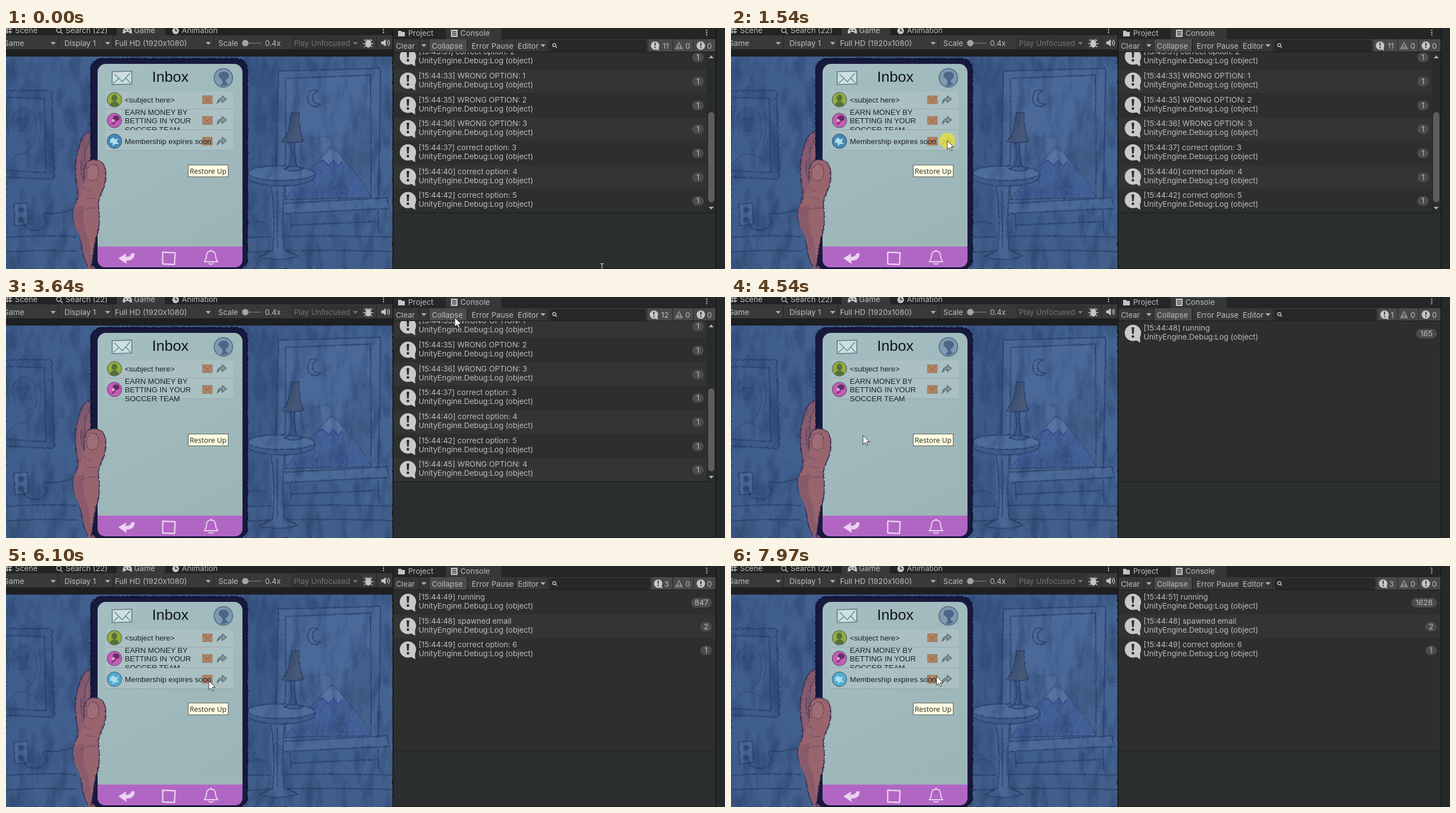
An HTML page for the animation above (8 s loop, 1280 by 430 pixels).

```html
<!DOCTYPE html>
<html lang="en">
<head>
<meta charset="utf-8">
<title>Inbox console</title>
<style>
html, body { margin: 0; width: 100%; height: 100%; overflow: hidden; background: #1c1d1d; }
svg { position: absolute; left: 0; top: 0; width: 1280px; height: 430px; }
#ui { will-change: transform; }
text { font: 13.5px Inter, Roboto, sans-serif; fill: #bcbebe; white-space: pre; }
.phone text { font: 13.45px "Liberation Sans", Arial, sans-serif; fill: #1c2226; }
.phone .head { font-size: 26.6px; fill: #11161c; }
.tip { font: 12.7px "Open Sans", "Noto Sans", sans-serif; fill: #222; }
.dim { fill: #747676; }
.mid { text-anchor: middle; }
.line { fill: none; stroke: #263961; stroke-width: 2; stroke-opacity: .72; stroke-linecap: round; stroke-linejoin: round; }
</style>
</head>
<body>
<svg id="stage" viewBox="0 0 1280 430"></svg>
<svg id="ui" viewBox="0 0 1280 430"></svg>
<script>
const LOOP = 8000, ROW = 42.67;

// ---------- drawing helpers ----------
const rect = (x, y, w, h, fill, more = '') =>
  `<rect x="${x}" y="${y}" width="${w}" height="${h}" fill="${fill}" ${more}/>`;
const path = (d, fill, more = '') => `<path d="${d}" fill="${fill}" ${more}/>`;
const line = (d, more = '') => `<path class="line" d="${d}" ${more}/>`;
const circle = (x, y, r, fill, more = '') =>
  `<circle cx="${x}" cy="${y}" r="${r}" fill="${fill}" ${more}/>`;
const oval = (x, y, rx, ry, fill, more = '') =>
  `<ellipse cx="${x}" cy="${y}" rx="${rx}" ry="${ry}" fill="${fill}" ${more}/>`;
const text = (x, y, s, cls = '') =>
  `<text x="${x}" y="${y}" class="${cls}">${s.replace(/</g, '&lt;')}</text>`;
const at = (x, y, s) => `<g transform="translate(${x} ${y})">${s}</g>`;
const outlined = (d, fill) => path(d, fill) + line(d);
const down = (x, y, fill = '#b0b2b2') => path(`M${x - 4.5} ${y - 2}h9l-4.5 5z`, fill);
const dots = (x, y) => [-4, 0, 4].map(d => circle(x, y + d, 1.2, '#c4c4c4')).join('');
const lens = (x, y, r, c) =>
  `<g fill="none" stroke="${c}" stroke-width="1.5">${circle(x, y, r, 'none')}` +
  `<path d="M${x + r * .7} ${y + r * .7}l${r} ${r}"/></g>`;

const bubble = (x, y, r, mark) => at(x, y, `<g transform="scale(${r / 14.5})">` +
  circle(0, 0, 14.5, '#c8caca') + path('M4 12L13 17.5 12.5 4z', '#c8caca') +
  path('M-2.4 -10h4.8l-1 12h-2.8z', mark) + circle(0, 6.6, 2.4, mark) + '</g>');

let seed = 7;
const rnd = () => (seed = seed * 16807 % 2147483647) / 2147483647;

// ---------- painted room ----------
function room() {
  let s = rect(0, 50, 688, 380, 'url(#wall)');
  for (let j = 0; j < 7; j++)
    for (let i = 0; i < 20; i++)
      s += oval(8 + i * 36 + (j % 2) * 18 + rnd() * 5, 68 + j * 46, 6, 11, '#304a78',
        `opacity="${.15 + rnd() * .2}"`);

  // skirting
  s += path('M0 374Q60 368 125 372V430H0z', '#425f8b') + path('M430 374H688V430H430z', '#425f8b');
  s += line('M0 374Q60 368 125 372M0 400Q60 395 125 398M430 374Q560 369 688 373M430 400Q560 394 688 399');

  // picture frame
  s += path('M0 113L80 114 84 270 0 266z', '#3d5a88');
  let lace = 'M0 113';
  for (let x = 0; x < 80; x += 10) lace += 'q5 -4 10 0';
  for (let y = 113; y < 268; y += 12) lace += 'q5 6 .3 12';
  for (let x = 83; x > 0; x -= 10) lace += 'q-5 4 -10 -.5';
  s += line(lace) + outlined('M0 124L68 126 71 258 0 254z', '#405e8b');
  s += line('M4 190Q8 148 34 142Q58 150 54 186Q50 214 34 222M12 172Q24 156 40 164M2 246Q20 218 36 226Q56 230 62 250' +
    'M22 184q4 -4 8 0M40 184q4 -4 8 0M30 204q6 4 12 0M8 140Q2 160 4 180M58 150Q66 180 58 204', 'opacity=".5"');

  // socket and cord
  s += outlined('M14 314L38 312 40 350 16 353z', '#4a6893');
  for (const y of [325, 342]) s += oval(27, y, 6, 6, '#375280') + line(`M25 ${y - 3}v4M29 ${y - 3}v4`);
  s += line('M30 345Q34 362 56 361Q78 352 70 340Q62 334 70 330Q92 334 124 322');
  s += line('M432 349Q450 340 466 352', 'opacity=".7"');

  // window
  s += outlined('M485 77L667 72 663 306 480 318z', '#486692');
  s += outlined('M498 90L649 84 650 302 497 306z', '#4a6999');
  s += path('M592 258Q584 216 606 205Q600 176 626 174Q630 152 649 150V300H600z', '#43618c');
  s += path('M545 258Q520 228 527 205Q538 186 552 200Q570 186 582 202Q588 226 545 258z', '#4e6d9b') +
    line('M545 258Q520 228 527 205Q538 186 552 200Q570 186 582 202', 'opacity=".3"');
  s += path('M499 304Q528 264 555 238L578 212Q592 220 606 240Q632 266 649 302z', '#446295');
  for (let i = 0; i < 230; i++) {
    const d = Math.sqrt(rnd()), x = 578 + (rnd() - .52) * 146 * d, y = 218 + 82 * d;
    if (d > .3) s += `<path d="M${x.toFixed(1)} ${y.toFixed(1)}l2.5 2" stroke="#33489c" stroke-width="1.5" opacity=".5"/>`;
  }
  s += path('M550 243L578 212Q592 220 608 244L598 238 592 247 582 236 574 246 564 235z', '#5774a3');
  s += line('M499 304Q528 264 555 238L578 212Q592 220 606 240Q632 266 649 302', 'opacity=".5"') +
    line('M556 240l8 -4 10 10 8 -10 10 11 6 -9', 'style="stroke:#2e4192"');
  s += line('M556 112Q540 106 537 123Q537 141 553 140Q558 139 561 136Q546 137 546 124Q546 115 556 112z');
  s += path('M494 312L678 303 682 322 497 331z', '#4a6996') +
    line('M490 313L678 303 682 322 494 331M506 332L508 362M662 326L664 366M506 352L664 345');

  // lamp and table
  s += path('M505 200h10l3 52h-16z', '#3e5a88') + line('M506 203Q512 226 505 248M514 203Q511 226 518 248');
  s += outlined('M508 152L522 151Q521 184 530 202Q510 207 491 203Q506 186 508 152z', '#465878');
  s += path('M470 276L497 276 494 396 516 408Q484 418 452 408L474 396z', '#486692') +
    line('M472 280Q480 340 475 396L452 408Q484 418 520 407L495 395Q490 340 496 280M483 290V392');
  s += oval(490, 265, 61, 16, '#3f5c8b') + oval(490, 259, 60, 13, '#4e6d9a') +
    line('M430 259Q434 246 490 246Q548 247 551 262Q548 281 490 282Q438 280 430 268M432 262Q450 272 490 272Q536 272 550 260');
  s += oval(512, 251, 17, 5, '#456390') + line('M495 251Q512 243 529 251Q512 259 495 251');
  return s;
}

const hand = () => path('M152 184Q136 186 130 212Q119 245 126 282Q130 300 126 310Q115 330 123 352Q136 380 136 400Q142 420 147 430H166V184z',
    '#8a5d70', 'stroke="#3a2d50" stroke-width="1.6"') +
  path('M150 200Q138 214 140 240M134 236Q132 262 140 278', 'none', 'stroke="#513c5c" stroke-width="1.6" opacity=".7"');

const thumb = () => path('M150 236Q171 231 177 252Q180 274 172 290Q162 308 165 325Q169 350 160 376Q156 390 152 430H146Q140 390 128 365Q116 342 122 318Q134 298 140 272Q136 242 150 236z',
    '#98656f') +
  path('M123 320Q118 344 130 366Q142 392 146 430L152 430Q152 390 142 362Q134 342 140 316z', '#835868', 'opacity=".7"') +
  path('M140 272Q136 242 150 236Q171 231 177 252Q180 274 172 290Q162 308 165 325Q169 350 160 376Q156 390 152 430',
    'none', 'stroke="#3a2d50" stroke-width="1.6"') +
  path('M144 268Q140 246 154 243Q166 244 165 260Q163 274 152 273z', '#a06d77', 'stroke="#6b475a" stroke-width="1.3"') +
  path('M138 284Q144 292 152 291M140 300Q148 306 158 304M130 330Q146 318 160 322', 'none', 'stroke="#5d4058" stroke-width="1.3" opacity=".5"');

// ---------- phone ----------
const person = c => oval(0, -3, 5, 6, c) + path('M-8 10Q-7 3 0 3Q7 3 8 10Q0 14 -8 10z', c);
const avatar = (y, fill, inner) => at(193, y, circle(0, 0, 13, fill, 'stroke="#3b5560" stroke-width="1"') + inner);
const mailIcons = y => at(358.5, y, rect(-8.5, -7, 17, 14, '#b28463', 'stroke="#95705a"') +
    path('M-8 -6L0 1 8 -6M-5 6L5 -4M-5 -4L5 6', 'none', 'stroke="#8a6450" stroke-width="1"')) +
  at(384, y, path('M-8 7Q-7 -3 1 -3V-7L8.5 -1 1 5V1Q-5 1 -8 7z', '#879da3', 'stroke="#52656d" stroke-width="1.3"'));
const band = (y, h) => rect(177, y, 228, h, '#aac0c3') + rect(177, y + h - 1, 228, 1, '#92a9ae');

function phone() {
  const pale = 'fill="none" stroke="#ead2f0" stroke-width="2.4" stroke-linecap="round" stroke-linejoin="round"';
  const frame = rect(152, 55.5, 277, 375, '#181a3d', 'rx="19" stroke="#14163a" stroke-width="4" filter="url(#rough)"');
  const screen = rect(163, 64, 258, 363, 'url(#glass)', 'rx="15"') +
    path('M163 390H421V412Q421 427 406 427H178Q163 427 163 412z', '#b266c4');
  const top = at(206, 89, path('M-17 -11L18 -12 18 11 -17 12z', '#cfdfdf', 'stroke="#5c7a86" stroke-width="1.6"') +
      path('M-13 -7L1 7 15 -9M-15 10L-5 1M16 10L7 0', 'none', 'stroke="#5b8d8c" stroke-width="1.5"')) +
    at(387, 89, circle(0, 0, 16.5, '#7f9bb1', 'stroke="#4a6482" stroke-width="1.5"') +
      path('M-9 -3L-7 -9 -2 -11 5 -11 10 -6 9 0 4 4 5 8 9 11Q2 16 -5 14L-1 8 -3 3z', '#4c6787')) +
    text(260, 96, 'Inbox', 'head');
  const mails = path('M177 144V119Q177 113 183 113H399Q405 113 405 119V144z', '#aac0c3') + rect(177, 144, 228, 1, '#92a9ae') +
    band(145, 37) +
    avatar(128, '#93ab40', person('#56703a')) +
    avatar(165, '#c55bb5', oval(3, -4, 6, 5, '#5f2f62') + path('M-6 8Q-3 1 3 1Q1 8 -6 8z', '#813a7c') + circle(-2, 0, 2.6, '#e6a5d6')) +
    mailIcons(128) + mailIcons(165) + text(211.5, 133, '<subject here>') +
    ['EARN MONEY BY', 'BETTING IN YOUR', 'SOCCER TEAM'].map((t, i) => text(211.5, 154.5 + i * 15.5, t)).join('');
  const nav = path('M200 411L214 402 213 408Q222 409 223 402L229 402Q229 415 214 415L215 421z', '#ead2f0') +
    `<g ${pale}><path d="M279 400L301 401 300 422 279 421z"/>` +
    '<path d="M353 417Q357 412 357 405Q358 398 365 398Q372 398 373 405Q373 412 377 417zM365 398V396M361 420Q365 423 369 420" stroke-width="1.9"/></g>';
  return `<g class="phone">${frame}${screen}${top}${mails}${nav}</g>`;
}

const expiring = (y, fill) => band(y - 20, 37) + avatar(y, fill,
    path('M-7 -3L-2 -7 1 -3 7 -5 4 1 8 5 1 5 -3 9 -3 3 -8 3z', '#b4dcec')) +
  mailIcons(y) + text(211.5, y + 4.5, 'Membership expires soon');

// ---------- editor chrome ----------
function editor() {
  const sep = (x, y, h) => rect(x, y, 1, h, '#222424');
  const ic = '#c4c4c4';
  let s = rect(0, 0, 688, 14, '#222323') + rect(197, 0, 86, 14, '#383939') + rect(0, 13, 688, 26, '#383939') +
    rect(0, 38, 688, 13, '#1d1f21');
  s += path('M2 0V10M7 0V10M0 2H11M0 7H11', 'none', `stroke="${ic}" stroke-width="1.5"`) + text(16, 9, 'Scene') +
    lens(94, 4, 4, ic) + text(106, 9, 'Search (22)') +
    path('M211 0H222Q225 5 224 10Q220 10 218 7H214Q212 10 208 10Q207 4 211 0z', ic) + circle(213, 4, 1.3, '#383939') + circle(219, 4, 1.3, '#383939') +
    text(228, 9, 'Game') + circle(302, 5, 6, ic) + path('M302 1V5H305', 'none', 'stroke="#222323" stroke-width="1.5"') +
    text(313, 9, 'Animation') + dots(672, 4);
  s += text(-5, 32, 'Game') + down(84, 27) + sep(93, 14, 24) + text(104, 32, 'Display 1') + down(181, 27) + sep(190, 14, 24) +
    text(194, 32, 'Full HD (1920x1080)') + down(360, 27) + sep(369, 14, 24) + text(378, 32, 'Scale') +
    rect(421, 26, 34, 2, '#626464') + circle(426, 27, 5.8, '#a3a5a5') + text(461, 32, '0.4x') +
    rect(508, 15, 122, 23, '#313333') + text(512.5, 32, 'Play Unfocused', 'dim') + down(622, 27, '#747676') + sep(632, 14, 24) + sep(659, 14, 24);
  s += oval(645, 28, 5, 7, ic) + path('M638 21l14 13M652 21l-14 13M636 28h18M641 20l2 2M649 20l-2 2', 'none', `stroke="${ic}" stroke-width="1.5"`) +
    path('M668 24H671L676 20V33L671 29H668z', ic) + path('M678 23q3 4 0 7M680.5 21q4.5 6 0 11', 'none', `stroke="${ic}" stroke-width="1.3"`);

  s += rect(688, 0, 592, 430, '#1a1b1b') + rect(690, 0, 573, 20, '#252626') + rect(783, 0, 99, 20, '#363737') +
    rect(690, 20, 573, 22, '#363737') + rect(690, 43, 573, 286, '#2d2e2e') + rect(690, 330, 573, 99, '#2b2e2e') + rect(1265, 0, 15, 430, '#252929');
  s += path('M698 5H703L705 7H710V15H698z', ic) + text(716, 14, 'Project') + rect(792, 3, 12, 13, ic, 'rx="1"') +
    path('M794 6.5H802M794 9.5H802M794 12.5H802', 'none', 'stroke="#363737" stroke-width="1.4"') + text(809, 14, 'Console') + dots(1247.5, 8);
  s += rect(754, 20, 66, 22, '#4a4b4b') + text(694, 37, 'Clear') + down(744, 31) + text(758, 37, 'Collapse') + text(829, 37, 'Error Pause') +
    text(911, 37, 'Editor') + down(956, 31);
  for (const x of [735, 753, 821, 906, 964]) s += sep(x, 20, 22);
  return s;
}

document.getElementById('stage').innerHTML = `<defs>
  <linearGradient id="wall" x2="1"><stop stop-color="#3f5d8b"/><stop offset=".3" stop-color="#446291"/>
    <stop offset=".64" stop-color="#3c5987"/><stop offset="1" stop-color="#446491"/></linearGradient>
  <linearGradient id="glass" x2=".4" y2="1"><stop stop-color="#a3bdc1"/><stop offset="1" stop-color="#9cb5b7"/></linearGradient>
  <filter id="rough" filterUnits="userSpaceOnUse" x="0" y="48" width="688" height="384" color-interpolation-filters="sRGB">
    <feTurbulence type="fractalNoise" baseFrequency=".28" numOctaves="2" seed="4"/>
    <feDisplacementMap in="SourceGraphic" scale="4" xChannelSelector="R" yChannelSelector="G"/></filter>
  <filter id="paint" filterUnits="userSpaceOnUse" x="0" y="51" width="688" height="379" color-interpolation-filters="sRGB">
    <feTurbulence type="fractalNoise" baseFrequency=".045 .016" numOctaves="4" seed="9"/>
    <feColorMatrix values="0 0 0 0 .12  0 0 0 0 .2  0 0 0 0 .36  2 0 0 0 -.9"/></filter>
  <clipPath id="view">${rect(0, 51, 688, 379, '#000')}</clipPath></defs>
  ${editor()}
  <g clip-path="url(#view)"><g filter="url(#rough)">${room()}${hand()}</g>
  ${rect(0, 51, 688, 379, '#000', 'filter="url(#paint)" opacity=".6"')}
  ${phone()}<g filter="url(#rough)">${thumb()}</g></g>`;

// ---------- motion ----------
// bursts of change: first time, last time, steps
const bursts = [[70, 250, 4], [390, 1000, 10], [1330, 1600, 5], [1800, 2550, 11], [2620, 3370, 12], [3440, 3770, 6],
  [3910, 4680, 12], [4750, 5490, 10], [5560, 5700, 3], [5900, 6300, 5], [6500, 7270, 12], [7340, 7970, 10]];
const steps = [0];
for (const [a, b, n] of bursts)
  for (let i = 0; i < n; i++) steps.push(Math.round(a + (b - a) * i / (n - 1)));

// pointer: time, x, y
const moves = [[0, 1061, 428], [250, 359, 298], [320, 359, 298], [600, 329, 268], [1000, 373, 199], [1265, 373, 199],
  [1397, 385, 201], [1730, 385, 201], [2550, 1030, 335], [2760, 1074, 346], [3370, 820, 40], [3638, 799, 37],
  [3770, 697, 30], [3980, 697, 30], [4540, 235, 247], [4610, 235, 247], [4750, 235, 243], [5490, 352, 210],
  [5700, 361, 205], [6100, 361, 205], [6430, 361, 204], [6850, 371, 203], [7270, 366, 197], [LOOP, 366, 197]];
const ticks = [[4150, 0], [4540, 165], [6100, 847], [7970, 1628], [LOOP, 1628]];
const presses = [[1397, 1600], [3910, 3980], [4610, 4750], [5900, 6000]];
const clearAt = 3980, runAt = 4150, spawns = [4820, 5100], solvedAt = 6000;

function track(keys, t, k, ease = u => u) {
  const i = Math.max(1, keys.findIndex(p => p[0] >= t));
  const [a, b] = [keys[i - 1], keys[i]];
  const u = Math.min(1, Math.max(0, (t - a[0]) / (b[0] - a[0])));
  return a[k] + (b[k] - a[k]) * ease(u);
}
const smooth = u => u * u * (3 - 2 * u);

const early = [['43:51', 'correct option: 2'], ['44:33', 'WRONG OPTION: 1'], ['44:35', 'WRONG OPTION: 2'], ['44:36', 'WRONG OPTION: 3'],
  ['44:37', 'correct option: 3'], ['44:40', 'correct option: 4'], ['44:42', 'correct option: 5'], ['44:45', 'WRONG OPTION: 4']];

function logRow(mid, odd, [time, msg, n = 1], right) {
  const w = 12 + 8.3 * String(n).length, c = Math.round(mid);
  return rect(690, mid - ROW / 2, 573, ROW, odd ? '#333434' : '#2d2e2e') + bubble(715.5, c - 1, 14.5, '#2a2b2b') +
    text(734.5, c - 5, `[15:${time}] ${msg}`) + text(734.5, c + 11, 'UnityEngine.Debug:Log (object)') +
    rect(right - w, c - 8, w, 17, '#4b4c4c', 'rx="8.5"') + text(right - w / 2, c + 5, String(n), 'mid');
}

function consoleView(t) {
  let s = '', count;
  if (t < clearAt) {
    const more = t >= 1800 ? 1 : 0;
    count = 11 + more;
    early.slice(more, 7 + more).forEach((row, i) => {
      s += logRow(308.3 - ROW * (6 - i), (i + more) % 2, row, 1242);
    });
    const y = more ? 163 : 150;
    s += rect(1247, 43, 16, 286, '#2a2b2b') + rect(1250, y, 11, 311 - y, '#5c5e5e', 'rx="5.5"') +
      path('M1251 54h9l-4.5 -5z', '#b0b2b2') + down(1255.5, 321);
  } else {
    const rows = [], sec = 48 + Math.floor((t - 4350) / 1000), mails = spawns.filter(p => t >= p).length;
    if (t >= runAt) rows.push(['44:' + sec, 'running', Math.max(1, Math.round(track(ticks, t, 1)))]);
    if (mails) rows.push(['44:48', 'spawned email', mails]);
    if (t >= solvedAt) rows.push(['44:49', 'correct option: 6']);
    count = rows.length;
    rows.forEach((row, i) => { s += logRow(65 + ROW * i, i % 2, row, 1256.5); });
  }
  s = `<g clip-path="url(#list)">${s}</g>`;

  const edge = { 11: 1140, 12: 1138, 1: 1148 }[count] || 1145.5;
  s += rect(968, 22.5, edge - 968, 18.5, '#272828', 'rx="4" stroke="#1b1c1c"') + lens(976, 30.5, 2.8, '#c0c0c0') +
    rect(edge + 4, 20, 1186 - edge - 4, 22, '#484949') + rect(1188, 20, 35, 22, '#484949') + rect(1225, 20, 38, 22, '#484949') +
    bubble(edge + 15.5, 31.5, 7.5, '#3a3b3b') + `<text x="1180" y="37" text-anchor="end">${count}</text>` +
    path('M1198 24L1205.5 38H1190.5z', '#858787') + rect(1197, 29, 2, 5, '#444545') + rect(1197, 35, 2, 1.6, '#444545') + text(1209.5, 37, '0') +
    circle(1237, 31.5, 7.5, '#c4c6c6') + rect(1236, 26.5, 2.2, 6, '#3a3b3b') + rect(1236, 34, 2.2, 2.2, '#3a3b3b') + text(1248, 37, '0');
  if (t >= 3910 && t < 4610) s += rect(783, 0, 99, 1, '#2c5d87');
  return s;
}

function mailView(t) {
  let s = '';
  if (t < 1600) s = expiring(202, '#4487b6');
  else if (t >= solvedAt) s = expiring(202, '#52acd0');
  else {
    if (t >= spawns[0]) s += expiring(202, '#4487b6');
    if (t >= spawns[1]) s += expiring(239, '#52acd0');
  }
  return `<g class="phone">${s}</g>`;
}

function pointer(t) {
  const x = track(moves, t, 1, smooth), y = track(moves, t, 2, smooth);
  const ink = 'stroke="#1c1c1c" stroke-width=".9" stroke-linejoin="round"';
  const glow = presses.some(([a, b]) => t >= a && t < b) ? circle(x, y, 14, '#e4df3c', 'opacity=".82"') : '';
  let shape = path('M0 0V16L3.8 12.5 6.4 18 8.8 17 6.4 11.5H11.5z', '#fff', ink);
  if (x > 690 && y > 338)
    shape = path('M-3 -7.5H-1L0 -6.5 1 -7.5H3M0 -6.5V6.5M-3 7.5H-1L0 6.5 1 7.5H3', 'none', 'stroke="#d8dada" stroke-width="1.2"');
  else if (x > 690 && y > 325)
    shape = path('M0 -9.5L4 -5H1V5H4L0 9.5 -4 5H-1V-5H-4z', '#fff', ink);
  return glow + at(x.toFixed(1), y.toFixed(1), shape);
}

const ui = document.getElementById('ui');
const clip = `<defs><clipPath id="list">${rect(690, 43, 573, 286, '#000')}</clipPath></defs>`;
const tip = rect(324.5, 244.5, 71, 21, '#ffffe1', 'stroke="#5a5a5a"') + text(327, 260, 'Restore Up', 'tip');

let shown = -1;
function draw(t) {
  const step = steps.filter(s => s <= t).pop();
  if (step === shown) return;
  shown = step;
  ui.innerHTML = clip + mailView(step) + tip + consoleView(step) + pointer(step);
}

const start = performance.now();
function loop() {
  draw((performance.now() - start) % LOOP);
  requestAnimationFrame(loop);
}
loop();
</script>
</body>
</html>
```
